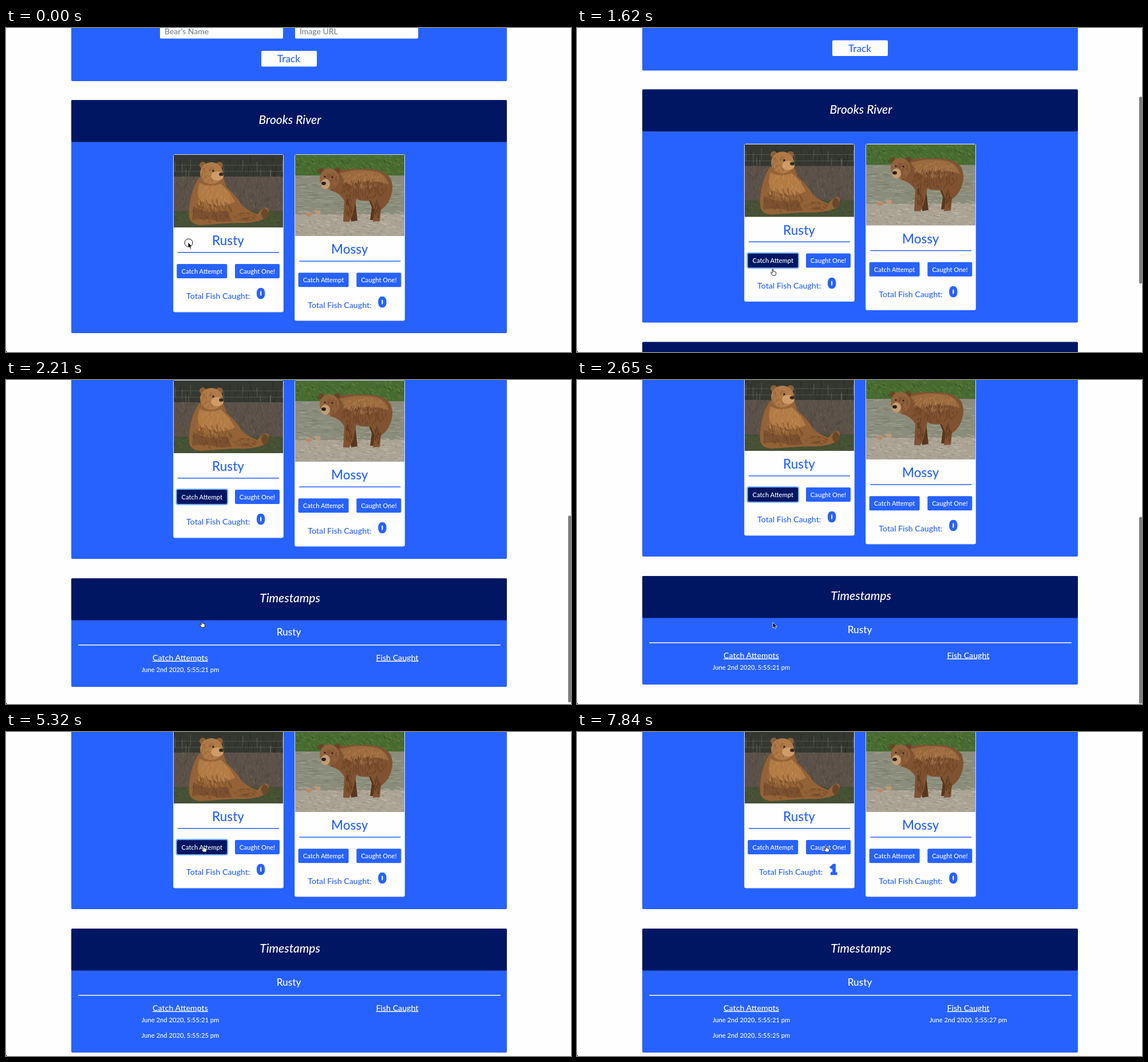
Write an HTML page that moves like this. It is 987 by 567 pixels and loops after 7.99 s.

```html
<!DOCTYPE html>
<html lang="en">
<head>
<meta charset="utf-8">
<title>Bear tracker</title>
<style>
  html, body { margin: 0; width: 100%; height: 100%; overflow: hidden; background: #fefefe; }
  svg { display: block; font: 500 14.2px Lato, "Open Sans", sans-serif; }
  text { text-anchor: middle; }
  .blue { fill: #2762ff; }
  .navy { fill: #001662; }
  .white { fill: #fefefe; }
  .hint { fill: #6c757d; text-anchor: start; font-size: 14px; font-weight: 400; }
  .title { fill: #fff; font-size: 21px; font-style: italic; }
  .name { font-size: 22.5px; }
  .small { fill: #fff; font-size: 11.2px; }
  .column { fill: #fff; text-decoration: underline; }
  .left { text-anchor: start; }
  .count { font-size: 22px; font-weight: 900; stroke: #2762ff; stroke-width: 2.6; }
  .ring { fill: none; stroke: #3b92ff; stroke-opacity: .65; stroke-width: 2.2; }
</style>
</head>
<body>
<svg id="stage" width="987" height="567" viewBox="0 0 987 567"></svg>
<script>
const STEP = 7990 / 54, LAST = 53;
const $ = id => document.getElementById(id);
const rect = (cls, x, y, w, h, r = 0, more = '') =>
  `<rect class="${cls}" x="${x}" y="${y}" width="${w}" height="${h}" rx="${r}" ${more}/>`;
const text = (cls, x, y, s, more = '') => `<text class="${cls}" x="${x}" y="${y}" ${more}>${s}</text>`;
const shape = (fill, d) => `<path fill="${fill}" d="${d}"/>`;
const blob = (fill, x, y, rx, ry = rx) => `<ellipse fill="${fill}" cx="${x}" cy="${y}" rx="${rx}" ry="${ry}"/>`;
const band = (fill, y, h) => `<rect fill="${fill}" y="${y}" width="191" height="${h}"/>`;

let seed = 7;
const rnd = () => (seed = seed * 16807 % 2147483647) / 2147483647;
const strokes = (n, color, point, dx, dy) => {
  let d = '';
  for (let i = 0; i < n; i++) d += `M${point().map(v => v.toFixed(1))}l${dx} ${dy}`;
  return `<path d="${d}" stroke="${color}" fill="none" opacity=".5"/>`;
};
const streaks = (n, color, y, h, dx, dy) =>
  strokes(n, color, () => [rnd() * 191, y + rnd() * h], dx, dy);
const fur = (n, color, x, y, rx, ry, dx, dy) => strokes(n, color, () => {
  const a = rnd() * 2 * Math.PI, r = Math.sqrt(rnd());
  return [x + rx * r * Math.cos(a), y + ry * r * Math.sin(a)];
}, dx, dy);

const sittingBear = () =>
  band('#343830', 0, 50) + streaks(40, '#1d211c', 0, 36, 0, 12) + streaks(12, '#85887f', 6, 22, 0, 18) +
  '<path d="M0 18H191M0 29H191" stroke="#6f736a" opacity=".5"/>' +
  band('#5b5148', 38, 66) + streaks(150, '#7b6b5d', 36, 56, 2, 6) + streaks(120, '#40392f', 36, 60, -2, 6) +
  band('#465034', 98, 30) + streaks(80, '#657045', 97, 28, 3, -2) + streaks(50, '#343c27', 98, 28, 4, 1) +
  shape('#936236', 'M44 40C32 56 26 86 27 106Q27 121 46 123L106 119Q142 121 162 110Q170 94 162 92Q152 95 146 104Q130 98 120 89Q110 72 92 56L86 38Z') +
  shape('#b17a45', 'M45 49Q63 59 82 50Q98 64 107 82Q82 96 52 82Q37 78 45 49Z') +
  shape('#7d5230', 'M34 90Q62 106 92 97L102 116L82 117Q54 110 32 114Z') +
  fur(150, '#c28d54', 70, 72, 30, 22, -1, 5) + fur(110, '#5c3a20', 66, 95, 34, 20, 2, 5) +
  fur(60, '#6b4427', 122, 108, 20, 8, 5, 1) +
  blob('#6b472c', 159, 103, 6, 9) +
  blob('#8b6038', 51, 18, 6) + blob('#8b6038', 80, 18, 6) + blob('#b07b48', 66, 32, 20, 19) +
  fur(60, '#8a5c33', 60, 32, 13, 14, 1, 4) +
  blob('#cf9c68', 76, 37, 11, 8) + blob('#392a20', 83, 34, 4, 3) + blob('#2c2019', 69, 28, 1.7);

const standingBear = () =>
  band('#486b31', 0, 38) + streaks(130, '#75a044', 0, 32, 5, 3) + streaks(100, '#283f20', 6, 30, 3, 4) +
  band('#8b8d7c', 36, 74) + streaks(130, '#b5b6a4', 38, 70, 10, 0) + streaks(90, '#646b52', 36, 60, 10, 0) +
  band('#aaa394', 104, 39) + streaks(130, '#d2cbbc', 98, 42, 7, 1) + streaks(90, '#766f63', 102, 38, 4, 1) +
  blob('#bc8867', 24, 104, 6, 3) + blob('#c29777', 40, 101, 5, 4) +
  shape('#57371f', 'M104 70L109 115L98 117L92 72ZM126 72L134 92L131 114L142 114L148 92L150 72Z') +
  shape('#805231', 'M64 32Q86 22 110 25Q152 22 166 40Q174 56 166 76Q162 88 150 96L148 116L136 117L139 96L132 80Q116 82 107 77L101 104L95 117L84 117L86 80Q78 66 61 62Z') +
  shape('#99693e', 'M78 32Q113 22 145 30Q160 37 164 52Q130 40 92 52Z') +
  fur(170, '#b98654', 122, 42, 38, 14, -2, 4) + fur(150, '#57371f', 120, 58, 40, 17, -1, 5) +
  fur(40, '#4d301b', 94, 88, 6, 18, 0, 5) + fur(40, '#4d301b', 144, 92, 5, 16, 0, 5) +
  blob('#6b4328', 46, 28, 5) + blob('#6b4328', 74, 27, 5) + blob('#92633d', 60, 42, 17, 18) +
  fur(60, '#6b4529', 64, 42, 11, 14, -1, 4) +
  blob('#c39c72', 53, 51, 8, 9) + blob('#291e18', 50, 50, 4, 3) + blob('#291e18', 52, 38, 1.6) + blob('#291e18', 65, 39, 1.6);

const button = (x, w, label, id) =>
  rect('blue', x, 413, w, 25, 2, id ? `id="${id}"` : '') + text('small', x + w / 2, 429.8, label);

// Lower half of a card, placed for the shorter photo
const details = (name, id) =>
  text('blue name', 388, 380, name) + rect('blue', 300, 392, 177, 1.5) +
  button(298.3, 88, 'Catch Attempt', id && 'attempt') + button(400, 78, 'Caught One!', id && 'caught') +
  `<g ${id ? 'id="total"' : ''}>` + text('blue left', 315, 474.3, 'Total Fish Caught:') +
  text('blue count', 445.2, 473, 0, id ? 'id="count"' : '') + '</g>';

const card = (x, photoHeight, photo, lower) =>
  rect('white', x - .5, 221.5, 192, photoHeight + 148.5, 2.5, 'stroke="#d4dcef"') +
  `<svg x="${x}" y="222" width="191" height="${photoHeight}">${photo}</svg>` + lower;

const panel = (y, h, title, id = '') =>
  rect('blue', 114, y, 761, h, 2, id) + rect('navy', 114, y, 761, 73.5, 2) + text('title', 496, y + 42, title);

const stamp = (x, y, sec, id = '') => text('small', x, y, `June 2nd 2020, 5:55:${sec} pm`, id);

$('stage').innerHTML = `<g id="page">
  ${rect('blue', 114, -100, 761, 193, 2)}
  ${rect('white', 269, -10, 215, 28.5, 2)}${text('hint', 277, 11, "Bear's Name")}
  ${rect('white', 505, -10, 215, 28.5, 2)}${text('hint', 513, 11, 'Image URL')}
  ${rect('white', 446, 40, 97, 27.5, 2)}${text('blue', 494, 60, 'Track', 'font-size="17.2"')}
  ${panel(126, 408, 'Brooks River')}
  ${card(293, 127, sittingBear(), details('Rusty', true))}
  ${card(505, 142, standingBear(), `<g transform="translate(212.3 15.3)">${details('Mossy')}</g>`)}
  ${rect('ring', 297.5, 412.2, 89.6, 26.6, 3, 'id="ring"')}
  ${rect('ring', 399.2, 412.2, 79.6, 26.6, 3, 'id="ring2"')}
  ${panel(568, 190, 'Timestamps', 'id="stamps"')}
  ${text('white', 494, 668, 'Rusty', 'font-size="17.2"')}${rect('white', 126, 684, 738, 1.5, .7)}
  ${text('column', 304.5, 711.5, 'Catch Attempts')}${text('column', 683.5, 711.5, 'Fish Caught')}
  ${stamp(304.5, 732, 21)}${stamp(304.5, 759, 25, 'id="second"')}${stamp(683.5, 732, 27, 'id="fish"')}
</g>
${rect('', 982, 0, 5, 327, 2.5, 'id="bar" fill="#7f7f7f"')}
<path d="M0 565L2 567H0Z"/>
<g id="cursor">
  <circle id="click" cx="1" cy="1" r="7" fill="#fff" fill-opacity=".3" stroke="#111"/>
  <path id="arrow" d="M0 0V10L2.4 8L4 11.5L5.8 10.7L4.2 7.4H7.3Z" stroke="#fff" stroke-width=".8"/>
  <path id="hand" d="M-.9 5V-1.4Q0-2.8.9-1.4V2.2Q2-.1 2.7 2.6Q4 1.5 4.4 3.3Q5.8 2.7 5.7 4.7Q5.8 7 4.5 9H-.4Q-3 5.8-3.5 4.2Q-2.8 2.8-.9 5Z" fill="#fff" stroke="#111" stroke-width=".9"/>
  <path id="beam" d="M-2-5Q0-5 0-3.5Q0-5 2-5M0-3.5V3.5M-2 5Q0 5 0 3.5Q0 5 2 5" fill="none" stroke="#fff" stroke-width="2.4"/>
  <path id="beamCore" d="M-2-5Q0-5 0-3.5Q0-5 2-5M0-3.5V3.5M-2 5Q0 5 0 3.5Q0 5 2 5" fill="none" stroke="#222"/>
</g>`;

// Keys are [step, value, ...], joined by straight lines
const scrollKeys = [[10, 0], [11, 18.5], [12, 96], [13, 178], [14, 209], [15, 221], [16, 225], [22, 225], [23, 224]];
const mouseKeys = [[0, 318, 375], [5, 342, 424], [22, 342, 424], [23, 335, 440], [25, 313, 499],
  [26, 313, 492], [30, 345, 201], [38, 345, 201], [43, 435, 201]];
const kindKeys = [[0, 'arrow'], [4, 'hand'], [17, 'arrow'], [24, 'beam'], [27, 'arrow'], [30, 'hand'],
  [40, 'arrow'], [42, 'hand']];

function at(keys, k, i = 1) {
  const n = keys.findIndex(p => p[0] > k);
  if (n < 0) return keys[keys.length - 1][i];
  if (n === 0) return keys[0][i];
  const a = keys[n - 1], b = keys[n];
  return a[i] + (b[i] - a[i]) * (k - a[0]) / (b[0] - a[0]);
}
const within = (k, a, b) => k >= a && k < b;
const show = (id, on) => $(id).setAttribute('opacity', +on);
const paint = (id, dark) => $(id).setAttribute('class', dark ? 'navy' : 'blue');

function draw(k) {
  const scroll = at(scrollKeys, k), kind = kindKeys.filter(p => p[0] <= k).pop()[1];
  $('page').setAttribute('transform', `translate(0 ${-scroll})`);
  $('bar').setAttribute('y', (190 + scroll) * .577);
  show('bar', k < 11 ? 0 : Math.max(0, Math.min(1, (21 - k) / 2)));
  paint('attempt', within(k, 4, 23) || within(k, 30, 40));
  paint('caught', within(k, 42, 50));
  show('ring', within(k, 8, 46));
  show('ring2', within(k, 46, 50));
  $('stamps').setAttribute('height', k < 34 ? 190 : 217);
  show('second', k >= 34);
  show('fish', k >= 47);
  $('count').textContent = +(k >= 47);
  $('total').setAttribute('transform', `translate(${k >= 47 ? 3 : 0} 0)`);
  $('cursor').setAttribute('transform', `translate(${at(mouseKeys, k)} ${at(mouseKeys, k, 2)})`);
  for (const name of ['arrow', 'hand', 'beam']) show(name, name === kind);
  show('beamCore', kind === 'beam');
  show('click', k < 1 || within(k, 8, 10) || within(k, 33, 35) || within(k, 46, 48));
}

const start = performance.now();
function tick() {
  const t = (performance.now() - start) % 7990;
  draw(Math.min(LAST, Math.floor((t + 15) / STEP)));
  requestAnimationFrame(tick);
}
tick();
</script>
</body>
</html>
```
